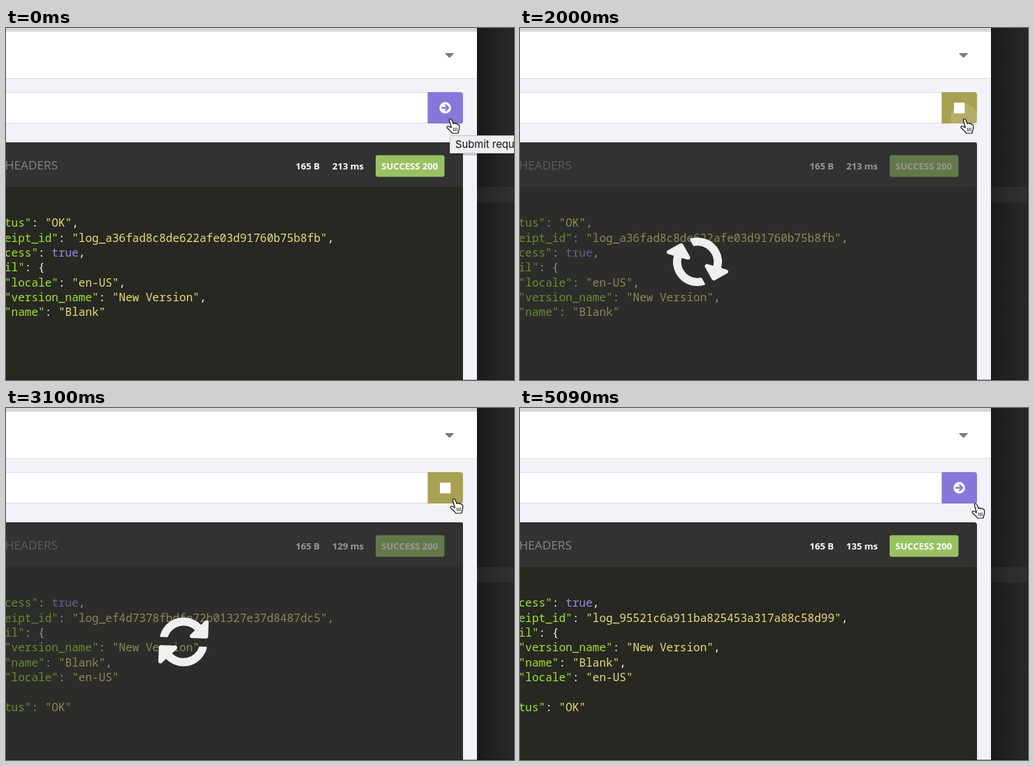
An HTML page that plays this animation: 727x505 px, repeating every 5190 ms.

```html
<!DOCTYPE html>
<html lang="en">
<head>
<meta charset="utf-8">
<title>Repeated request</title>
<style>
  html, body { margin: 0; width: 100%; height: 100%; overflow: hidden; background: #272727; }
  svg { display: block; width: 727px; height: 505px; }
  text { white-space: pre; }
  .code { font: 16.05px "Noto Sans Mono", monospace; fill: #f8f8f2; }
  .key { fill: #a2e22e; }
  .str { fill: #e8dc78; }
  .bool { fill: #9d86ee; }
  .tab { font: 17.2px "Open Sans", sans-serif; fill: #868686; }
  .stat { font: 700 13.05px "Open Sans", sans-serif; fill: #fff; }
  .tip { font: 14.8px Inter, sans-serif; fill: #111; }
</style>
</head>
<body>
<svg viewBox="0 0 727 505">
  <defs>
    <linearGradient id="shade">
      <stop offset="0" stop-color="#191919"/>
      <stop offset=".5" stop-color="#222"/>
      <stop offset="1" stop-color="#292929"/>
    </linearGradient>
    <path id="half" d="M1639 1056q0 5-1 7-64 268-268 434.5t-478 166.5q-146 0-282.5-55t-243.5-157l-129 129q-19 19-45 19t-45-19-19-45v-448q0-26 19-45t45-19h448q26 0 45 19t19 45-19 45l-137 137q71 66 161 102t187 36q134 0 250-65t186-179q11-17 53-117 8-23 30-23h192q13 0 22.5 9.5t9.5 22.5z"/>
  </defs>

  <!-- desktop -->
  <rect x="674" width="53" height="505" fill="url(#shade)"/>
  <rect x="674" y="228" width="53" height="22.5" fill="#fff" opacity=".045"/>
  <path d="M726.5 0V505" stroke="#000" opacity=".35"/>

  <!-- window -->
  <rect width="674" height="505" fill="#f2f2f8"/>
  <rect width="674" height="72" fill="#fff"/>
  <rect width="674" height="5.3" fill="#d6d6d6"/>
  <path d="M0 72.5H674" stroke="#dddde2"/>
  <path d="M628.8 36.5H640.6L634.7 42.6Z" fill="#7c7c7c" stroke="#7c7c7c" stroke-linejoin="round"/>
  <rect x="-2" y="92.5" width="606" height="44" fill="#fff" stroke="#dcdce3"/>
  <path id="button" d="M603.5 92H650Q654 92 654 96V133.5Q654 137 650.5 137H603.5Z"/>
  <g id="arrow">
    <circle cx="628.6" cy="114.5" r="8.3" fill="#fff"/>
    <path d="M623.2 114.5H632.6M628.6 109.9L633.2 114.5L628.6 119.1" fill="none" stroke="#8777da" stroke-width="2.3"/>
  </g>
  <g id="clock" fill="none" stroke="#fff">
    <circle cx="628.6" cy="114.5" r="7.1" stroke-width="2.4"/>
    <path d="M629.2 110.2V115.4H625.2" stroke-width="1.5"/>
  </g>
  <rect id="stop" x="621" y="107" width="15.4" height="15.4" fill="#fff"/>

  <!-- response -->
  <path d="M0 164H649.5Q654 164 654 168.5V505H0Z" fill="#272822"/>
  <path d="M0 164H649.5Q654 164 654 168.5V228H0Z" fill="#323232"/>
  <text class="tab" x="-1.2" y="202.6">HEADERS</text>
  <text class="stat" x="414.5" y="202.7">165 B</text>
  <text class="stat" id="time" x="467" y="202.7"></text>
  <rect x="529" y="182.5" width="98.5" height="31" rx="3" fill="#98c262"/>
  <text class="stat" x="537.3" y="202.7">SUCCESS 200</text>
  <g id="bodies" class="code"></g>

  <g id="overlay">
    <rect y="164" width="654" height="341" fill="#323232" opacity=".5"/>
    <g id="spinner" fill="#f0f0f0">
      <use href="#half"/>
      <use href="#half" transform="rotate(180 896 896)"/>
    </g>
  </g>
  <path d="M0 504.5H727" stroke="#000" opacity=".3"/>

  <g id="tip">
    <rect x="635" y="155" width="110" height="28" fill="#000" opacity=".18"/>
    <rect x="635.5" y="154.5" width="110" height="25" fill="#eee" stroke="#c4c4c4"/>
    <text class="tip" x="643" y="172.3">Submit request</text>
  </g>

  <g id="spot">
    <circle id="ring"/>
    <circle id="dot" r="5.2" fill="#e6df4e"/>
  </g>

  <g id="hand" stroke="#111" stroke-width="1.2" stroke-linejoin="round" stroke-linecap="round">
    <path fill="#fff" d="M634.6 133C633.8 130 637 129.2 638.1 132L640.2 137.4C641 136 643.2 136.2 643.6 137.7C644.6 136.6 646.2 137 646.5 138.5C648 138 648.8 139 648.7 141L648.5 144.5C648.3 146.7 647.2 147.6 647 151H638.6C638 149 634.6 146.6 631.6 143.6C630 141.6 632 140 634 141.2L637.4 143Z"/>
    <path fill="none" stroke-width=".9" d="M640.4 143.6L640.9 147.8M642.8 143.4L643 147.8M645.2 143.2V147.6"/>
  </g>
</svg>

<script>
const LOOP = 5190;
const $ = id => document.getElementById(id);
const show = (id, on) => { $(id).style.display = on ? '' : 'none'; };

// Value of a stepped track [[ms, value], ...] at time t
const at = (track, t) => track.reduce((v, [ms, next]) => t >= ms ? next : v, null);

const status = '"status": "OK"', success = '"success": true', open = '"email": {';
const receipt = id => `"receipt_id": "log_${id}"`;
const locale = '    "locale": "en-US"', version = '    "version_name": "New Version"', name = '    "name": "Blank"';
const late = id => [success + ',', receipt(id) + ',', open, version + ',', name + ',', locale, '},', status];

const replies = [
  { ms: 213, lines: [status + ',', receipt('a36fad8c8de622afe03d91760b75b8fb') + ',', success + ',', open,
                     locale + ',', version + ',', name, '}'] },
  { ms: 445, lines: [status + ',', success + ',', open, version + ',', locale + ',', name, '},',
                     receipt('2dfb4d8520aaa5e1f1487745465e9bab')] },
  { ms: 129, lines: late('ef4d7378fbdfe72b01327e37d8487dc5') },
  { ms: 135, lines: late('95521c6a911ba825453a317a88c58d99') }
];

const span = (cls, s) => `<tspan class="${cls}">${s}</tspan>`;
const paint = line => line.replace(/"[^"]*"(?=:)|"[^"]*"|true/g, (s, i, all) =>
  span(s === 'true' ? 'bool' : all[i + s.length] === ':' ? 'key' : 'str', s));

$('bodies').innerHTML = replies.map(r => '<g>' + r.lines.map((line, i) =>
  `<text x="-40.5" y="${285.2 + i * 21.33}">${paint(line)}</text>`).join('') + '</g>').join('');

const reply = [[0, 0], [2200, 1], [3100, 2], [4300, 3]];
const icon = [[0, 'arrow'], [1090, 'clock'], [1800, 'stop'], [4300, 'arrow']];
const spin = [[0, null], [1900, 25], [2000, 61], [2100, 97], [2200, 5], [2900, 22], [3000, 58],
              [3100, 2], [4000, 20], [4100, 56], [4200, 92], [4300, null]];
const hand = [[0, [0, 0]], [2200, [2, 0]], [2900, [3, 0]], [3000, [4, 0]], [3100, [5, 0]],
              [4990, [9, 3]], [5090, [16, 7]]];
const clicks = [
  { down: 100, grow: 400, up: 600, x: 635.5 },
  { down: 1600, grow: 1700, up: 1800, x: 635.5 },
  { down: 4200, grow: 4300, up: 4500, x: 640.5 }
];

function drawSpot(t) {
  const c = clicks.find(c => t >= c.down && t < c.up + 400);
  show('spot', c);
  if (!c) return;
  const step = Math.floor((t - c.up) / 100);
  const held = step < 0;
  const ring = $('ring');
  $('spot').setAttribute('transform', `translate(${c.x} 128.5)`);
  show('dot', held || step === 0);
  $('dot').style.opacity = held ? 1 : .5;
  ring.setAttribute('r', held ? (t < c.grow ? 9.3 : 10) : 12.5 + Math.min(step * 3, 6.5));
  ring.style.fill = held ? '#f6f4d4' : '#fff';
  ring.style.fillOpacity = held ? .92 : [.55, .3, .13, .04][step];
  ring.style.stroke = held ? 'none' : '#fff';
  ring.style.strokeOpacity = held ? 0 : [.5, .35, .2, .06][step];
}

function draw(t) {
  const n = at(reply, t), mode = at(icon, t), angle = at(spin, t);
  [...$('bodies').children].forEach((g, i) => { g.style.display = i === n ? '' : 'none'; });
  $('time').textContent = replies[n].ms + ' ms';
  for (const id of ['arrow', 'clock', 'stop']) show(id, id === mode);
  $('button').setAttribute('fill', mode === 'stop' ? '#a8a153' : '#8777da');
  show('overlay', angle !== null);
  $('spinner').setAttribute('transform',
    `translate(254 335.5) rotate(${angle || 0}) scale(.0456) translate(-896 -896)`);
  show('tip', t < 100);
  drawSpot(t);
  $('hand').setAttribute('transform', `translate(${at(hand, t)})`);
}

const start = performance.now();
function tick() {
  draw((performance.now() - start) % LOOP);
  requestAnimationFrame(tick);
}
tick();
</script>
</body>
</html>
```
